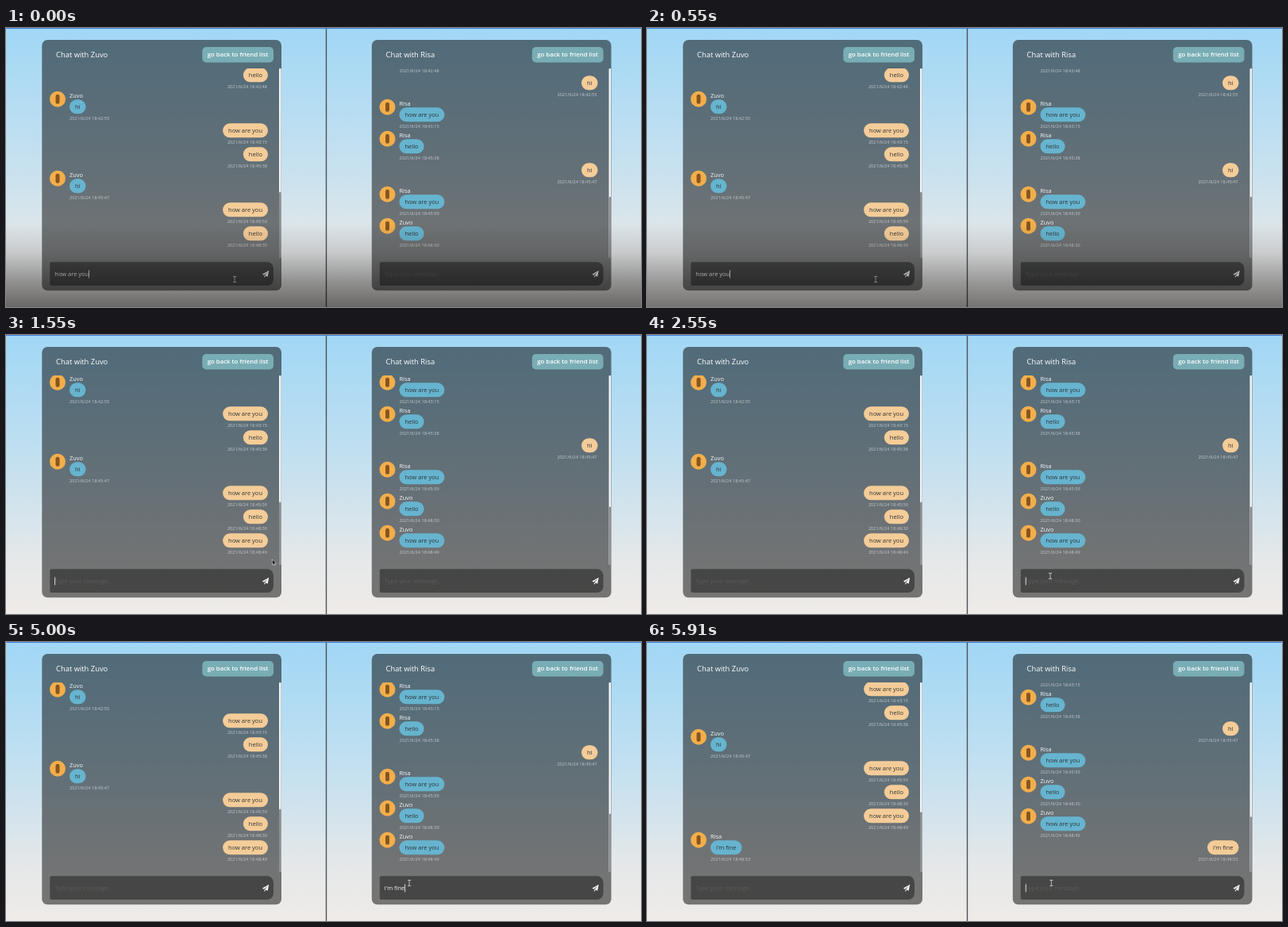
An HTML page with a canvas that plays this animation: 800x352 px, repeating every 6 s.

```html
<!DOCTYPE html>
<html lang="en">
<head>
<meta charset="utf-8">
<title>Two chat windows</title>
<style>
  html, body { margin: 0; width: 100%; height: 100%; overflow: hidden; }
  canvas { display: block; }
</style>
</head>
<body>
<canvas id="stage" width="800" height="352"></canvas>
<script>
const ctx = document.getElementById("stage").getContext("2d");
const LOOP = 6000, FIRST_SEND = 1180, FOCUS = 2300, REPLY_SEND = 5640;
const REPLY = "i'm fine";
const KEYS = [3090, 3360, 3640, 4000, 4270, 4450, 4640, 4820];
const LEFT = 0, RIGHT = 1;

// text, time, sender's side, name shown to the receiver
const MESSAGES = [
  ["hello", "42:48", LEFT, "Risa"],
  ["hi", "42:55", RIGHT, "Zuvo"],
  ["how are you", "43:15", LEFT, "Risa"],
  ["hello", "45:38", LEFT, "Risa"],
  ["hi", "45:47", RIGHT, "Zuvo"],
  ["how are you", "45:59", LEFT, "Risa"],
  ["hello", "48:30", LEFT, "Zuvo"],
  ["how are you", "48:49", LEFT, "Zuvo"],
  [REPLY, "48:53", RIGHT, "Risa"]
];

function font(size, weight = 400) {
  ctx.font = `${weight} ${size}px "Open Sans", "Noto Sans", sans-serif`;
}

function text(str, x, y, size, color, weight, align = "left") {
  font(size, weight);
  ctx.textAlign = align;
  ctx.fillStyle = color;
  ctx.fillText(str, x, y);
}

function box(x, y, w, h, r, color) {
  ctx.beginPath();
  ctx.roundRect(x, y, w, h, r);
  ctx.fillStyle = color;
  ctx.fill();
}

function poly(points, color) {
  ctx.beginPath();
  points.forEach(([x, y]) => ctx.lineTo(x, y));
  ctx.closePath();
  ctx.fillStyle = color;
  ctx.fill();
}

function vertical(y0, y1, stops) {
  const g = ctx.createLinearGradient(0, y0, 0, y1);
  stops.forEach(([at, color]) => g.addColorStop(at, color));
  return g;
}

const sky = vertical(0, 352, [
  [0, "#a1d7f5"], [0.3, "#b7ddf2"], [0.55, "#cce2ee"], [0.8, "#e5e8e9"], [1, "#efebe8"]
]);
const shade = vertical(246, 352, [
  [0, "rgba(0,0,0,0)"], [0.35, "rgba(0,0,0,.13)"], [0.7, "rgba(0,0,0,.38)"], [1, "rgba(0,0,0,.56)"]
]);

function avatar(x, y) {
  box(x - 10, y - 10, 20, 20, 10, "#f2ae4b");
  box(x - 2.5, y - 6, 5, 12, 2.5, "#87561f");
}

function message([str, time, from, name], side, y) {
  const mine = from === side;
  font(7.5);
  const w = ctx.measureText(str).width + 14;
  const x = mine ? 330 - w : 80;
  if (!mine) {
    avatar(65, y - 9.5);
    text(name, 80, y - 11.4, 7.4, "#f4f6f7", 500);
  }
  box(x, y - 9, w, 18, 9, mine ? "#f4cc98" : "#66b4cf");
  text(str, x + 7, y + 2.6, 7.5, "#303437");
  text("2021/6/24 18:" + time, mine ? 329 : 80, y + 17, 5.6, "#c3c9cc", 400, mine ? "right" : "left");
}

function history(side, count) {
  ctx.save();
  ctx.beginPath();
  ctx.rect(45, 51, 302, 239);
  ctx.clip();
  let y = 259.3;
  for (let i = count - 1; i >= 0 && y > 20; i--) {
    message(MESSAGES[i], side, y);
    y -= MESSAGES[i][2] === side ? 30 : 40;
  }
  const thumb = (side === LEFT ? 207 : 213) + (count - 7) * 3.8;
  box(344, 51, 2.7, 239, 1, "#f2f3f3");
  box(344, thumb, 2.7, 290 - thumb, 1, "#8d8f90");
  ctx.restore();
}

function chat(side, count, typed, caret) {
  ctx.save();
  ctx.translate(side * 415.5, 0);
  box(45.3, 15, 301.7, 316.3, 7, "rgba(0,0,0,.5)");
  text("Chat with " + (side === LEFT ? "Zuvo" : "Risa"), 63, 37.2, 9.4, "#fff", 500);
  box(247.3, 24, 89.7, 19.4, 5, "#79adb5");
  text("go back to friend list", 292, 36.4, 7.8, "#fff", 600, "center");
  history(side, count);

  box(55.3, 295.3, 281.7, 29.7, [2, 8, 8, 2], "rgba(0,0,0,.4)");
  text(typed || "Type your message...", 61.3, 313.2, 7.5, typed ? "#f4f4f4" : "#5c5c5b");
  if (caret) {
    font(7.5);
    box(61.3 + ctx.measureText(typed).width, 305.5, 0.8, 10, 0, "#fff");
  }
  poly([[331.2, 306], [322.8, 310.8], [325, 311.8], [330, 307.6], [326.1, 312.3], [329.7, 313.8]], "#fff");
  poly([[325.4, 312.4], [325.4, 315], [327.1, 313.1]], "#fff");
  ctx.restore();
}

function ease(t, from, to) {
  const p = Math.min(1, Math.max(0, (t - from) / (to - from)));
  return p * p * (3 - 2 * p);
}

function pointer(t) {
  const a = ease(t, 750, 1450), b = ease(t, 1730, 2230), c = ease(t, 5500, 5800);
  const x = 288 + 48 * a + 172 * b + 1.3 * c;
  const y = 317 - 30 * a + 17 * b;
  const local = x > 404 ? x - 415.5 : x;
  if (local > 55 && local < 337 && y > 295) {
    box(x - 0.4, y - 3.5, 0.9, 7, 0, "#c8c8c8");
    box(x - 2, y - 4, 4.2, 0.9, 0, "#c8c8c8");
    box(x - 2, y + 3.2, 4.2, 0.9, 0, "#c8c8c8");
  } else {
    const tip = [[0, 0], [0, 7], [1.6, 5.6], [2.7, 8], [3.8, 7.5], [2.8, 5.2], [5, 5.1]];
    poly(tip.map(([px, py]) => [x - 0.6 + px, y - 4 + py]), "#111");
    ctx.strokeStyle = "#e8e8e8";
    ctx.lineWidth = 0.6;
    ctx.stroke();
  }
}

function draw(t) {
  ctx.fillStyle = sky;
  ctx.fillRect(0, 0, 800, 352);

  const sent = t >= FIRST_SEND, replied = t >= REPLY_SEND;
  const count = 7 + sent + replied;
  const keys = KEYS.filter(k => k <= t);
  const lastInput = [200, FIRST_SEND, FOCUS, ...KEYS, REPLY_SEND].filter(k => k <= t).pop() ?? 0;
  const blink = (t - lastInput) % 1000 < 500;
  const onRight = t >= FOCUS;

  chat(LEFT, count, sent ? "" : "how are you", blink && !onRight);
  chat(RIGHT, count, replied ? "" : REPLY.slice(0, keys.length), blink && onRight);

  box(402.8, 0, 1.4, 352, 0, "#4d5357");
  box(0, 0, 800, 1, 0, "#3f7ddd");
  pointer(t);

  ctx.globalAlpha = 1 - ease(t, 450, 1000);
  ctx.fillStyle = shade;
  ctx.fillRect(0, 246, 800, 106);
  ctx.globalAlpha = 1;
}

const start = performance.now();
function tick() {
  draw((performance.now() - start) % LOOP);
  requestAnimationFrame(tick);
}
tick();
</script>
</body>
</html>
```
